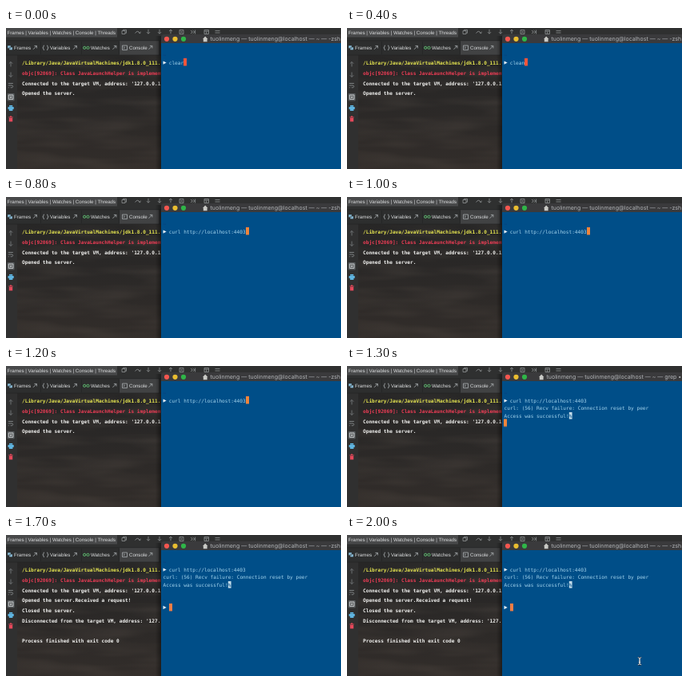
Animation, 419 px wide and 177 px high, one loop 2.1 s. Source, as an HTML page:

```html
<!DOCTYPE html>
<html lang="en">
<head>
<meta charset="utf-8">
<title>Server console and terminal</title>
<style>
html, body { margin: 0; width: 100%; height: 100%; overflow: hidden; background: #2c2a28; }
svg { display: block; width: 419px; height: 177px; }
text { text-rendering: geometricPrecision; white-space: pre; }
.ui { font: 6.2px "Liberation Sans", Arial, sans-serif; fill: #dcdedf; }
.title { font: 7px Inter, "Liberation Sans", sans-serif; fill: #b4b7ba; }
.mono { font: 6.13px "DejaVu Sans Mono", monospace; fill: #a5d5ee; }
.log { font: bold 6.13px "DejaVu Sans Mono", monospace; fill: #f1f1ef; }
.line { fill: none; stroke: #a0a4a6; stroke-width: .9; }
.tools { stroke: #85888a; }

.step { animation: 2100ms step-end infinite; }
.clear { animation-name: clear; }
.clean { animation-name: clean; }
.curl { animation-name: curl; }
.reply { animation-name: reply; }
.idle { animation-name: idle; }
.busy { animation-name: busy; }
.done { animation-name: done; }
.pointer { animation-name: pointer; }
.caret { animation-name: caret; }

@keyframes clear { 0% { opacity: 1 } 14.285% { opacity: 0 } }
@keyframes clean { 0% { opacity: 0 } 14.285% { opacity: 1 } 23.809% { opacity: 0 } }
@keyframes curl { 0% { opacity: 0 } 23.809% { opacity: 1 } }
@keyframes reply { 0% { opacity: 0 } 61.904% { opacity: 1 } }
@keyframes idle { 0% { opacity: 1 } 61.904% { opacity: 0 } 66.666% { opacity: 1 } }
@keyframes busy { 0% { opacity: 0 } 61.904% { opacity: 1 } 66.666% { opacity: 0 } }
@keyframes done { 0% { opacity: 0 } 66.666% { opacity: 1 } }
@keyframes pointer { 0% { opacity: 0 } 90.476% { opacity: 1 } }
@keyframes caret {
  0% { transform: translate(222px, 38px); fill: #f4553a }
  23.809% { transform: translate(300px, 38px); fill: #f0853c }
  61.904% { transform: translate(196px, 66.5px); fill: #f0853c }
  66.666% { transform: translate(204px, 86px); fill: #ee7d45 }
}
</style>
</head>
<body>
<svg viewBox="0 0 419 177">
  <defs>
    <linearGradient id="wood" x2="0" y2="1">
      <stop offset="0" stop-color="#262626"/>
      <stop offset=".5" stop-color="#2a2827"/>
      <stop offset="1" stop-color="#322d2a"/>
    </linearGradient>
    <linearGradient id="shade">
      <stop offset="0" stop-opacity="0"/>
      <stop offset="1" stop-opacity=".4"/>
    </linearGradient>
    <filter id="grain" x="0" y="0" width="1" height="1">
      <feTurbulence type="fractalNoise" baseFrequency=".012 .08" numOctaves="2" seed="4"/>
      <feColorMatrix values="0 0 0 0 .42  0 0 0 0 .33  0 0 0 0 .26  1.6 0 0 0 -.6"/>
    </filter>
    <path id="pin" class="line" d="M0 2.2L4.4-2.2M1.4-2.2h3v3"/>
    <path id="prompt" d="M196.5 41.4l4.2 2.2-4.2 2.2z" fill="#e6eff5"/>
    <path id="house" d="M246 14l3.2-3.4 3.2 3.4h-.8v3.2h-4.8V14z" fill="#c9cac6"/>
    <path id="beam" d="M363.8 153.8q2.2 0 2.2 1.4v6.2q0 1.4-2.2 1.4M368.2 153.8q-2.2 0-2.2 1.4v6.2q0 1.4 2.2 1.4M364.8 159.8h2.4"/>
  </defs>

  <!-- Console background and gutter -->
  <rect width="419" height="177" fill="url(#wood)"/>
  <rect x="14" y="34" width="180" height="143" filter="url(#grain)" opacity=".13"/>
  <rect y="34" width="14" height="143" fill="#303030"/>

  <!-- Toolbar -->
  <rect width="419" height="17" fill="#2f3030"/>
  <rect width="139" height="11.5" fill="#48494a"/>
  <text class="ui" x="1.5" y="7.6">Frames | Variables | Watches | Console | Threads</text>
  <g class="line tools">
    <path d="M145 3.5h4v4h-4zM146.5 3.5v-1.2h4v4H149"/>
    <path d="M161.5 6.5q3-4.5 6 0M165.8 5.8l1.9 1 .6-2.2"/>
    <path d="M178 1.8v5.4M176 5.2l2 2 2-2"/>
    <path d="M192 1.8v5.4M190 5.2l2 2 2-2"/>
    <path d="M206 7.2V2M204 4l2-2 2 2"/>
    <path d="M217 2.5h5v5h-5zM218.2 3.7l2.6 2.6M220.8 3.7l-2.6 2.6"/>
    <path d="M231 3l2.3 2-2.3 2M233.6 3l2.3 2-2.3 2M236.6 2.5v5"/>
    <path d="M248 2.5h5.5v5H248zM248 4.2h5.5M250.7 4.2v3.3"/>
    <path d="M261.5 3.5h6M261.5 6h6"/>
  </g>

  <!-- Tabs -->
  <rect y="16" width="194" height="18" fill="#2d2e2e"/>
  <rect x="142" y="16" width="49" height="18" fill="#414243"/>
  <path d="M0 15.8H194M0 34H194" stroke="#232424" stroke-width=".7"/>
  <path d="M43.5 17v16M94.5 17v16M141.5 17v16" stroke="#242525" stroke-width=".8"/>
  <path d="M2 22h4v3.6H2zM4 24h4v3.6H4z" fill="#8fc3e0" stroke="#2d2e2e" stroke-width=".4"/>
  <path d="M48 22q-1.4 0-1.2 1.4t-1 1.4q1.2 0 1 1.4t1.2 1.4M51 22q1.4 0 1.2 1.4t1 1.4q-1.2 0-1 1.4t-1.2 1.4" class="line"/>
  <g fill="none" stroke="#5fbd70" stroke-width="1">
    <circle cx="98.2" cy="24.8" r="1.6"/><circle cx="102.5" cy="24.8" r="1.6"/>
  </g>
  <path d="M145.5 22h6v5.6h-6zM147 23.5l1.4 1.2-1.4 1.2" class="line"/>
  <g class="ui">
    <text x="10" y="26.8">Frames</text>
    <text x="55" y="26.8">Variables</text>
    <text x="106" y="26.8">Watches</text>
    <text x="154" y="26.8">Console</text>
  </g>
  <use href="#pin" x="34" y="24.6"/>
  <use href="#pin" x="84" y="24.6"/>
  <use href="#pin" x="133.5" y="24.6"/>
  <use href="#pin" x="178.5" y="24.6"/>

  <!-- Gutter icons -->
  <g class="line">
    <path d="M6 48.5v-6M3.8 44.7L6 42.5l2.2 2.2" stroke="#75797b"/>
    <path d="M6 55.5v6M3.8 59.3L6 61.5l2.2-2.2" stroke="#75797b"/>
    <path d="M2.8 69.5h6M2.8 72h5q1.8 1.4 0 2.8H5.6M2.8 74.8h1" stroke="#85898b"/>
    <rect x="1.6" y="82" width="9" height="9.6" rx="1" fill="#56595b" stroke="none"/>
    <path d="M3.3 84h5.6v5.4H3.3zM6.1 85v2.7M4.9 86.8l1.2 1.2 1.2-1.2" stroke="#d4d7d9"/>
  </g>
  <path d="M4 97h4.2v1.7H4zM2.5 99h7.2v3H8.4v2H3.8v-2H2.5z" fill="#5fb4e0"/>
  <path d="M3.3 111.4h5.4v1H3.3zM5 110.5h2v.9H5zM3.8 113h4.4v4.6H3.8z" fill="#e4485a"/>

  <!-- Debug log -->
  <g class="log">
    <text x="20" y="46.1" style="fill:#e6e650">/Library/Java/JavaVirtualMachines/jdk1.8.0_111.</text>
    <text x="20" y="59" style="fill:#ef3d56">objc[92069]: Class JavaLaunchHelper is implemented</text>
    <text x="20" y="71.6">Connected to the target VM, address: '127.0.0.1</text>
    <text x="20" y="84.2">Opened the server.</text>
    <g class="step done">
      <text x="86.4" y="84.2">Received a request!</text>
      <text x="20" y="96.9">Closed the server.</text>
      <text x="20" y="109.5">Disconnected from the target VM, address: '127.</text>
      <text x="20" y="134.8">Process finished with exit code 0</text>
    </g>
  </g>

  <!-- Terminal window -->
  <rect x="187" y="10" width="7" height="167" fill="url(#shade)"/>
  <path d="M194 177V11.5q0-3.5 3.5-3.5H419V177z" fill="#3a3a3c"/>
  <path d="M194 19H419V177H194z" fill="#004e88"/>
  <circle cx="201" cy="13.8" r="3.1" fill="#f4564f"/>
  <circle cx="211.5" cy="13.8" r="3.1" fill="#e9bd30"/>
  <circle cx="222" cy="13.8" r="3.1" fill="#2fb548"/>
  <g class="title step idle">
    <use href="#house"/>
    <text x="255.5" y="16.3">tuolinmeng — tuolinmeng@localhost — ~ — -zsh</text>
  </g>
  <g class="title step busy">
    <use href="#house" x="-6"/>
    <text x="249.5" y="16.3">tuolinmeng — tuolinmeng@localhost — ~ — grep • -zsh</text>
  </g>

  <use href="#prompt"/>
  <rect class="step caret" width="4" height="9.5"/>
  <g class="mono">
    <text x="196.5" y="36.4" style="fill:#0d3a78">~</text>
    <text class="step clear" x="203.7" y="45.8">clear</text>
    <text class="step clean" x="203.7" y="45.8">clean</text>
    <text class="step curl" x="203.7" y="45.8">curl http://localhost:4403</text>
    <g class="step reply">
      <text x="196.5" y="55.2">curl: (56) Recv failure: Connection reset by peer</text>
      <text x="196.5" y="64.7">Access was successful!</text>
      <rect x="277.8" y="58" width="3.8" height="8.6" fill="#c3dcea"/>
      <text x="277.8" y="64.7" style="fill:#004e88">%</text>
    </g>
    <g class="step done">
      <text x="196.5" y="83.6" style="fill:#0d3a78">~</text>
      <use href="#prompt" y="47.4"/>
    </g>
  </g>

  <!-- Text pointer -->
  <g class="step pointer" fill="none">
    <use href="#beam" stroke="#0c2238" stroke-width="1.9"/>
    <use href="#beam" stroke="#e6ecf0" stroke-width=".9"/>
  </g>
</svg>
</body>
</html>
```
